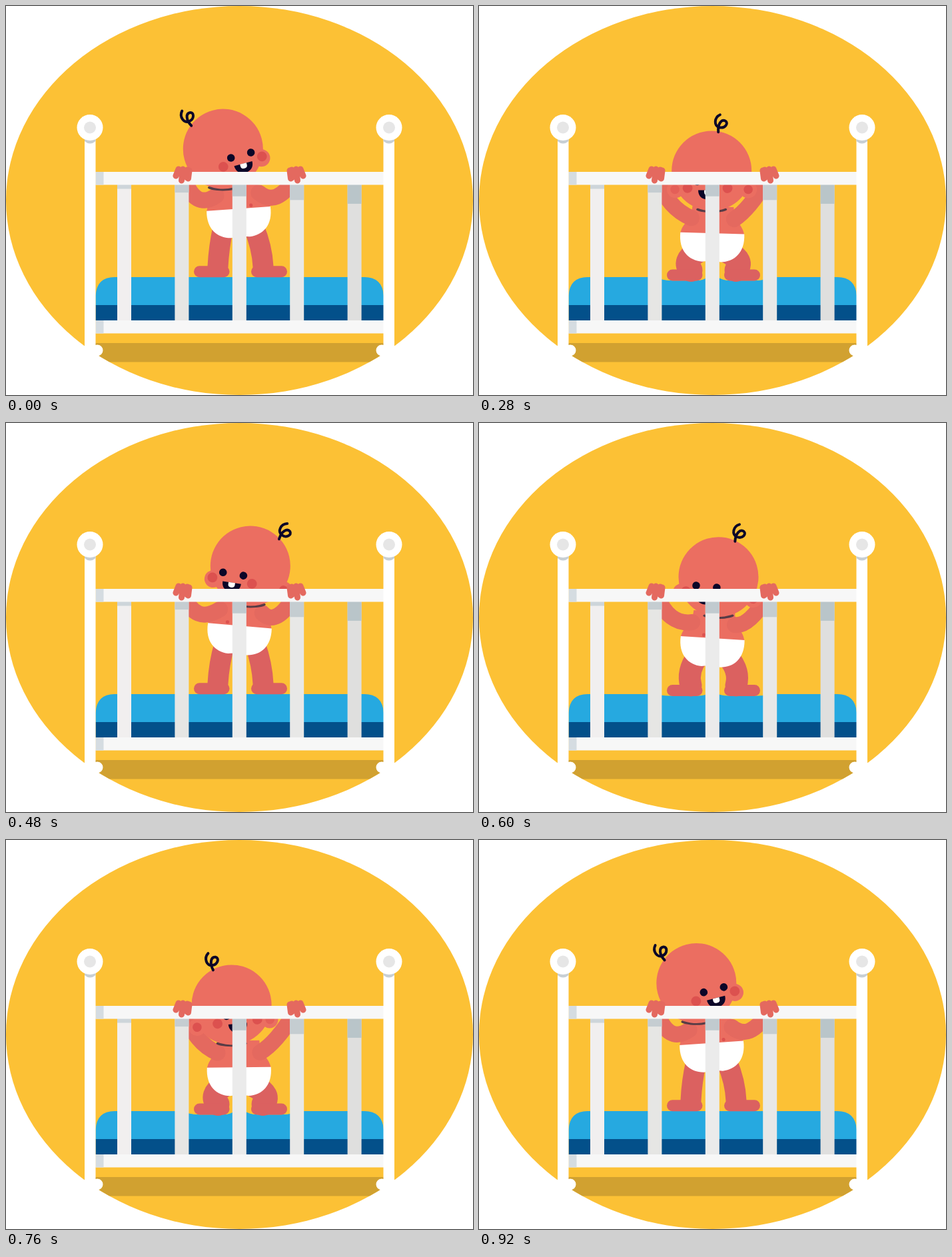
These frames come from a looping animation (701 by 584 pixels, 0.96 s). An HTML page:

```html
<!DOCTYPE html>
<html lang="en">
<head>
<meta charset="utf-8">
<title>Bouncing baby</title>
<style>
  html, body { margin: 0; width: 100%; height: 100%; overflow: hidden; background: #fff; }
  svg { display: block; width: 100%; height: 100%; }
  .line { fill: none; stroke-linecap: round; stroke-linejoin: round; }
  .skin { fill: #eb6e61; }
  .arm { stroke: #e4695f; stroke-width: 24; }
  .hand { stroke: #e4695f; stroke-width: 9; }
  .leg { stroke: #db6160; }
  .foot { stroke: #db6160; stroke-width: 17; }
  .blush { fill: #dc514f; }
  .ink { fill: #0b0628; }
  .rail { fill: #f7f7f7; }
  .joint { fill: #d5dce1; }
</style>
</head>
<body>
<svg viewBox="0 0 701 584" preserveAspectRatio="none">
  <defs>
    <clipPath id="oval"><ellipse cx="350.5" cy="292" rx="350.5" ry="292"/></clipPath>
    <g id="post">
      <path fill="#fff" d="M118 195H134.5V530H118Z"/>
      <circle cx="137" cy="517" r="8.5" fill="#fff"/>
      <path fill="#c8cfd4" d="M118 195H134.5V203Q126 210 118 203Z"/>
      <circle cx="126" cy="182.5" r="19.5" fill="#fff"/>
      <circle cx="126" cy="182.5" r="9" fill="#e6e6e6"/>
    </g>
    <path id="grip" class="line hand" d="M259 245L255 255M265.5 245L263.5 262M272 246V258M275 247L273.5 259"/>
  </defs>

  <g clip-path="url(#oval)">
    <rect width="701" height="584" fill="#fcc135"/>
    <rect x="134" y="506" width="433" height="28.5" fill="#d1a130"/>
  </g>

  <path id="bed" fill="#26a9e0"/>
  <rect x="134.5" y="449" width="432.5" height="23" fill="#03508a" id="base"/>

  <path id="legL" class="line leg"/>
  <path id="legR" class="line leg"/>
  <path id="footL" class="line foot" d="M290.5 0H327"/>
  <path id="footR" class="line foot" d="M376.5 0H413.5"/>

  <g id="body">
    <path class="skin" d="M-48 2C-46 -14 -32 -18 -31 -40H31C32 -18 46 -14 48 2Z"/>
    <circle id="navel" class="blush" cy="-4" r="2.6"/>
    <path fill="#fff" d="M-48 0H48C50 28 34 42 14 43Q0 40 -14 43C-34 42 -50 28 -48 0Z"/>
  </g>
  <path id="armL" class="line arm"/>
  <path id="armR" class="line arm"/>

  <g id="head">
    <ellipse id="chin" cy="58" rx="23" ry="4.8" fill="#573c46"/>
    <circle id="earL" class="skin" cy="28" r="13"/>
    <circle id="earR" class="skin" cy="28" r="13"/>
    <circle class="skin" r="60"/>
    <circle id="innerL" class="blush" cy="28" r="6.8"/>
    <circle id="innerR" class="blush" cy="28" r="6.8"/>
    <g id="face">
      <circle class="blush" cx="-30" cy="26" r="7.4"/>
      <circle class="blush" cx="30" cy="26" r="7.4"/>
      <circle class="ink" cx="-15.5" cy="16" r="5.8"/>
      <circle class="ink" cx="15.5" cy="16" r="5.8"/>
      <path class="ink" d="M-14 29H14C14 38 8 43 0 43S-14 38 -14 29Z"/>
      <path fill="#fff" d="M-5 29H5V32Q5 36.5 0 36.5T-5 32Z"/>
    </g>
  </g>
  <path id="curl" class="line" stroke="#0b0628" stroke-width="4"
        d="M3 -25C-6 -21 -7 -8 2 -6C10 -4 16 -12 11 -15.5C5 -19 -1 -11 0 1"/>

  <g id="bars"></g>
  <rect class="rail" x="134.5" y="249" width="432.5" height="19.5"/>
  <rect class="rail" x="134.5" y="472" width="432.5" height="19.5"/>
  <rect class="joint" x="134.5" y="249" width="12" height="19.5"/>
  <rect class="joint" x="134.5" y="472" width="12" height="19.5"/>
  <use href="#post"/>
  <use href="#post" transform="translate(701 0) scale(-1 1)"/>
  <use href="#grip"/>
  <use href="#grip" transform="translate(701 0) scale(-1 1)"/>
</svg>

<script>
const LOOP = 960, STEP = 40;
const $ = id => document.getElementById(id);
const set = (id, attrs) => {
  for (const k in attrs) $(id).setAttribute(k, attrs[k]);
};
const place = (id, x, y, deg = 0) =>
  set(id, { transform: `translate(${x} ${y}) rotate(${deg})` });

// Bars: light tone plus a shadow under the rail that grows to the right
const tones = ['#f1efef', '#e6e6e4', '#ebebeb', '#e8e8e7', '#dfdfde'];
const shades = ['#cdd5da', '#c5cdd1', '#c1cacf', '#c5cdd1', '#b9c5c9'];
$('bars').innerHTML = tones.map((tone, i) => {
  const x = 167 + 86.4 * i;
  return `<rect x="${x}" y="268" width="21" height="204" fill="${tone}"/>` +
         `<rect x="${x}" y="268" width="21" height="${6.5 + 5.6 * i}" fill="${shades[i]}"/>`;
}).join('');

function bedPath(dip) {
  const y = 407 + dip;
  return `M134.5 450V435Q136 407 163 407H252C268 407 272 ${y} 290 ${y}H326` +
    `C340 ${y} 338 407 351 407S362 ${y} 378 ${y}H414` +
    `C432 ${y} 434 407 450 407H538Q565 407 567 435V450Z`;
}

function draw(t) {
  const a = 2 * Math.PI * t / LOOP;
  const sway = Math.cos(a), beat = Math.cos(2 * a);
  const lift = Math.sin(Math.PI / 2 * beat);   // 1 standing, -1 squatting

  // Mattress, feet and legs
  const dip = 2.6 * (1 - lift), floor = 407.3 + dip;
  const bx = 350 - sway, by = 323 - 18.6 * lift;
  set('bed', { d: bedPath(dip) });
  place('footL', 0, floor - 8.5);
  place('footR', 0, floor - 8.5);
  for (const [id, s] of [['legL', -1], ['legR', 1]]) {
    const ankle = 352 + 34 * s, knee = 352 + s * (40 - 7.5 * lift);
    set(id, {
      d: `M${bx + 23 * s} ${by + 28}Q${knee} ${(by + 28 + floor - 16) / 2} ${ankle} ${floor - 16}`,
      'stroke-width': 33 - 2 * lift
    });
  }

  // Torso and arms
  const lean = 0.5 - 4.5 * sway, r = lean * Math.PI / 180;
  place('body', bx, by, lean);
  set('navel', { cx: 19 * sway });
  for (const [id, s] of [['armL', -1], ['armR', 1]]) {
    const x = bx + 32 * s * Math.cos(r) + 22 * Math.sin(r);
    const y = by + 32 * s * Math.sin(r) - 22 * Math.cos(r);
    set(id, { d: `M${350.5 + 83.5 * s} 258Q${345 + 61 * s} ${305 - 2 * s * sway} ${x} ${y}` });
  }

  // Head turns and tilts
  const hx = 345 - 20.5 * sway + 1.3 * beat, hy = 231.2 - 16.6 * lift;
  const tilt = -3 - 12 * sway, turn = 23.5 * sway;
  place('head', hx, hy, tilt);
  place('face', turn, 0);
  set('chin', { transform: `rotate(${-tilt})` });
  for (const [side, s] of [['L', -1], ['R', 1]]) {
    const x = 55 * s, far = Math.max(0, turn * s);
    set('ear' + side, { cx: x - 0.12 * far * s });
    set('inner' + side, { cx: x, opacity: Math.max(0, 1 - far / 12) });
  }

  // Curl trails the head along its crown
  const deg = -6.5 - 50 * sway + 6 * Math.sin(a) + 3 * beat;
  const c = deg * Math.PI / 180;
  place('curl', hx + 60 * Math.sin(c), hy - 60 * Math.cos(c), 0.6 * (deg - 11));
}

const start = performance.now();
function tick() {
  const t = (performance.now() - start) % LOOP;
  draw(Math.floor(t / STEP) * STEP);
  requestAnimationFrame(tick);
}
tick();
</script>
</body>
</html>
```
